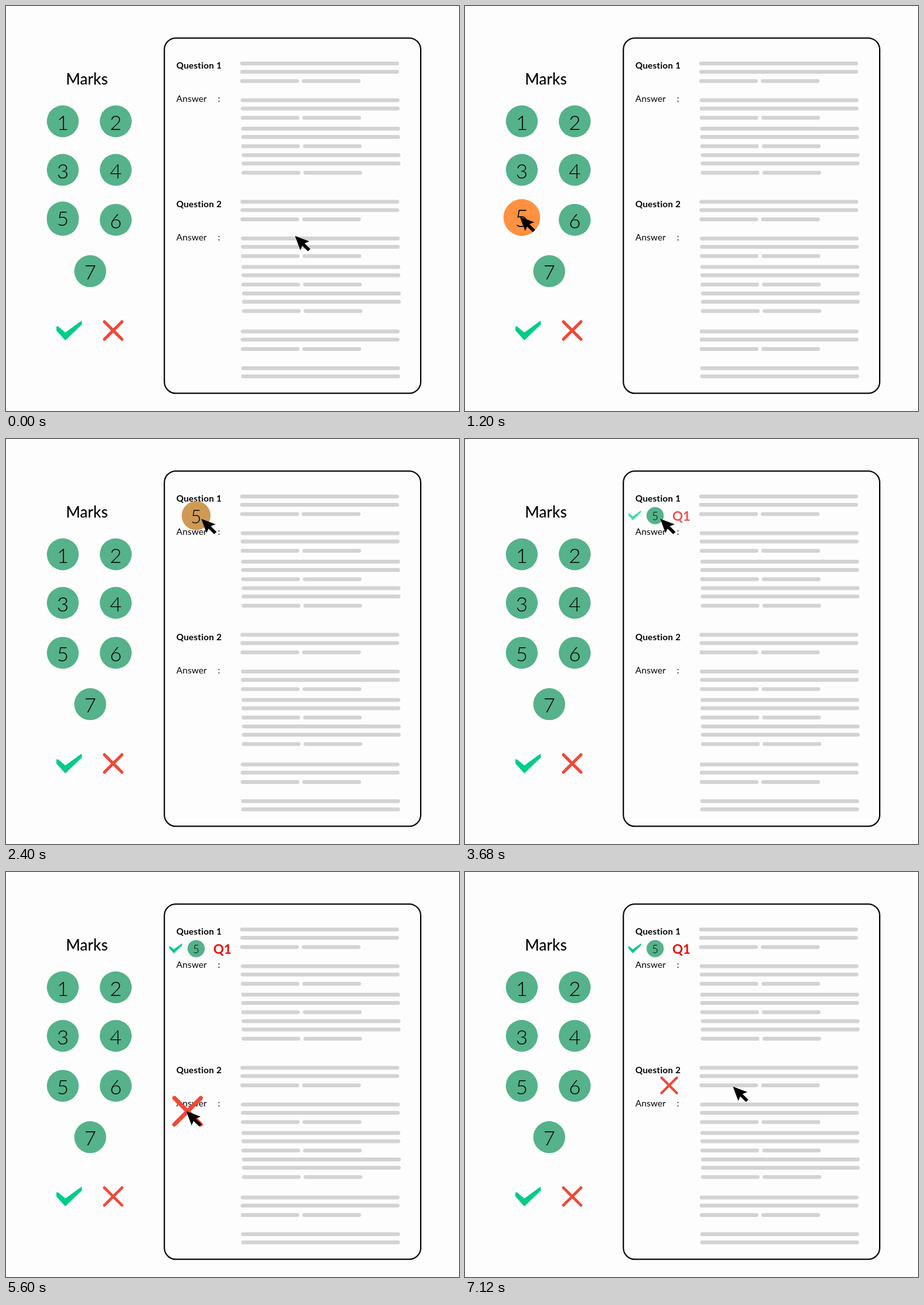
An HTML page that plays this animation: 710 by 634 pixels, repeating every 7160 ms.

```html
<!DOCTYPE html>
<html lang="en">
<head>
<meta charset="utf-8">
<title>Marking an answer sheet</title>
<style>
  html, body { margin: 0; width: 100%; height: 100%; overflow: hidden; background: #fdfdfd; }
  svg { display: block; font-family: Lato, "Noto Sans", sans-serif; }
  .digit { font-size: 32px; font-weight: 300; text-anchor: middle; }
  .label { font-size: 14px; letter-spacing: .2px; }
  .bold { font-weight: 700; }
</style>
</head>
<body>
<svg id="stage" width="710" height="634" viewBox="0 0 710 634">
  <defs>
    <path id="tick" fill="#00cc88" d="M-20-6.5 -17.5-6.5 -6 3 19.5-15.5 20-9.5 -6 15.5 -20 0Z"/>
    <path id="cross" fill="none" stroke="#ee4a38" stroke-width="4.4" stroke-linecap="round"
      d="M-13.8-13.8 13.8 13.8M13.8-13.8 -13.8 13.8"/>
  </defs>
  <rect x="248.2" y="50.3" width="401.8" height="556" rx="18" fill="#fdfdfd" stroke="#000" stroke-width="2"/>
  <g id="lines" stroke="#d3d3d3" stroke-width="6" stroke-linecap="round"></g>
  <text x="94" y="123" font-size="24" font-weight="500">Marks</text>
  <g id="labels"></g>
  <g id="tray"></g>
  <use href="#tick" x="99" y="508"/>
  <use href="#cross" x="168" y="508"/>
  <g id="result">
    <use href="#tick" transform="translate(266 119.5) scale(.5)"/>
    <text x="325" y="128" font-size="20.5" fill="#e80808" class="bold">Q1</text>
  </g>
  <g id="badge"></g>
  <use id="mark" href="#cross"/>
  <path id="cursor" d="M0 0 22.5 8.5 15 11.5 24 20.5 20.3 24 11.3 15.3 8.3 22.3Z"/>
</svg>
<script>
const LOOP = 7160, STEP = 80;
const GREEN = [85, 178, 138], ORANGE = [255, 145, 64];
const $ = id => document.getElementById(id);

// Text lines: each section repeats the same four paragraphs until the page ends
const SECTIONS = [90, 306.5, 509.4], PARAGRAPHS = [0, 57.5, 102, 143.5], PAGE_END = 590;

const bar = (x, y, w) => y < PAGE_END ? `<path d="M${x + 3} ${y}h${w - 6}"/>` : '';
const paragraph = (x, y) =>
  bar(x, y, 249) + bar(x, y + 12.9, 249) + bar(x, y + 27.5, 92) + bar(x + 96.7, y + 27.5, 92);

$('lines').innerHTML = SECTIONS.flatMap((top, s) =>
  PARAGRAPHS.map((dy, i) => paragraph(367 + .8 * i + .4 * s, top + dy))).join('');

$('labels').innerHTML = SECTIONS.slice(0, 2).map((top, s) =>
  `<text class="label bold" x="267" y="${top + 8}">Question ${s + 1}</text>
   <text class="label" x="267" y="${top + 60}">Answer</text>
   <text class="label" x="332" y="${top + 60}">:</text>`).join('');

// Tray: two columns whose rows spread slightly, the last disc centred
const disc = n => `<circle r="25" fill="rgb(${GREEN})"/><text class="digit" y="13">${n}</text>`;
for (let i = 0; i < 7; i++) {
  const row = i >> 1;
  const x = i === 6 ? 132 : 89 + 83 * (i % 2);
  const y = 180.5 + 74.9 * row + 1.1 * row * row;
  $('tray').innerHTML += `<g transform="translate(${x} ${y})">${disc(i + 1)}</g>`;
}
$('badge').innerHTML = disc(5);

// Motion
const ramp = (t, start, span = 480) => {
  const p = Math.min(1, Math.max(0, (t - start) / span));
  return p * p * (3 - 2 * p);
};
const mix = (a, b, p) => a.map((v, i) => v + (b[i] - v) * p);

function place(id, at, size = 1) {
  $(id).setAttribute('transform', `translate(${at}) scale(${size})`);
}

function draw(t) {
  const dragFive = ramp(t, 1238, 686);
  const dragCross = ramp(t, 5030, 830);

  const press = ramp(t, 480);
  place('badge', mix([89, 331], [298, 120], dragFive), 1 + .15 * press - .61 * ramp(t, 2192));
  const color = mix(GREEN, ORANGE, press - ramp(t, 2234)).map(Math.round);
  $('badge').firstChild.setAttribute('fill', `rgb(${color})`);
  $('result').setAttribute('opacity', ramp(t, 3376));

  place('mark', mix([168, 508], [320, 334], dragCross),
    1 + .5 * ramp(t, 4440) - .625 * ramp(t, 5900));

  let tip = mix([453, 360], [86, 330], ramp(t, 0));
  tip = mix(tip, [306, 125], ramp(t, 1250, 686));
  tip = mix(tip, [166, 508], ramp(t, 3800, 600));
  tip = mix(tip, [318, 334], dragCross);
  place('cursor', mix(tip, [420, 336], ramp(t, 6600, 520)));
}

const origin = performance.now();
function tick() {
  const t = (performance.now() - origin) % LOOP;
  draw(Math.floor(t / STEP) * STEP);
  requestAnimationFrame(tick);
}
tick();
</script>
</body>
</html>
```
